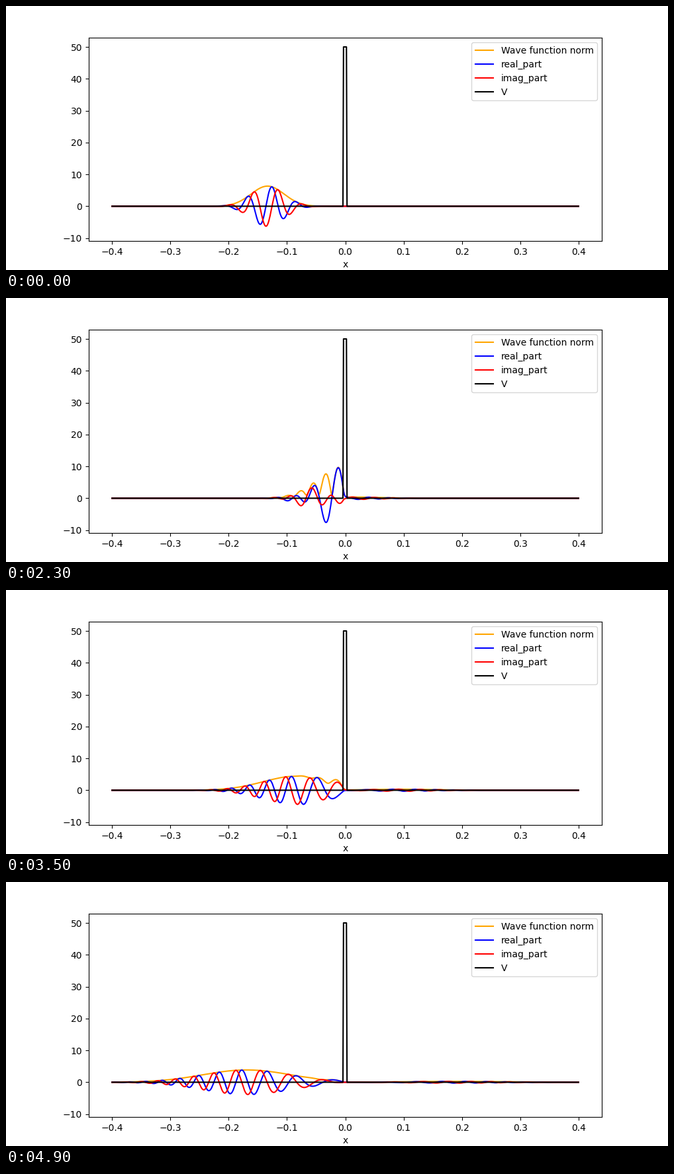
Animation of 1000 by 400 pixels, one loop 5000 ms. Source, as a matplotlib script:

```python
import numpy as np
import matplotlib.pyplot as plt
from matplotlib.animation import FuncAnimation

# Gaussian packet hitting a thin barrier (hbar = m = 1)
FRAMES, INTERVAL = 50, 100
DT = 4.09e-5            # simulated time per frame
K0, X0, SIGMA = 150.0, -0.1333, 0.02
AMPLITUDE = 6.316
V0, V_SHOWN = 1.25e5, 50

N = 801
x = np.linspace(-0.4, 0.4, N)
dx = x[1] - x[0]
barrier = (x > -0.0035) & (x < 0.0025)

# Exact evolution in the eigenbasis of the discrete Hamiltonian
hop = np.full(N - 1, -0.5 / dx**2)
H = np.diag(1 / dx**2 + V0 * barrier) + np.diag(hop, 1) + np.diag(hop, -1)
energy, modes = np.linalg.eigh(H)
psi0 = AMPLITUDE * np.exp(-(x - X0)**2 / (4 * SIGMA**2) + 1j * K0 * x)
coeffs = modes.T @ psi0


def psi_at(t):
    return modes @ (coeffs * np.exp(-1j * energy * t))


plt.rcParams["font.family"] = "DejaVu Sans"
fig, ax = plt.subplots(figsize=(10, 4), dpi=100)
norm_line, = ax.plot(x, np.abs(psi0), color="orange", label="Wave function norm")
real_line, = ax.plot(x, psi0.real, color="blue", label="real_part")
imag_line, = ax.plot(x, psi0.imag, color="red", label="imag_part")
ax.plot(x, V_SHOWN * barrier, color="black", label="V")
ax.set_xlim(-0.44, 0.44)
ax.set_ylim(-10.9, 52.9)
ax.set_xlabel("x")
ax.legend(loc="upper right")


def update(i):
    psi = psi_at(i * DT)
    norm_line.set_ydata(np.abs(psi))
    real_line.set_ydata(psi.real)
    imag_line.set_ydata(psi.imag)
    return norm_line, real_line, imag_line


anim = FuncAnimation(fig, update, frames=FRAMES, interval=INTERVAL,
                     repeat=True, repeat_delay=0, blit=False)
plt.show()
```
